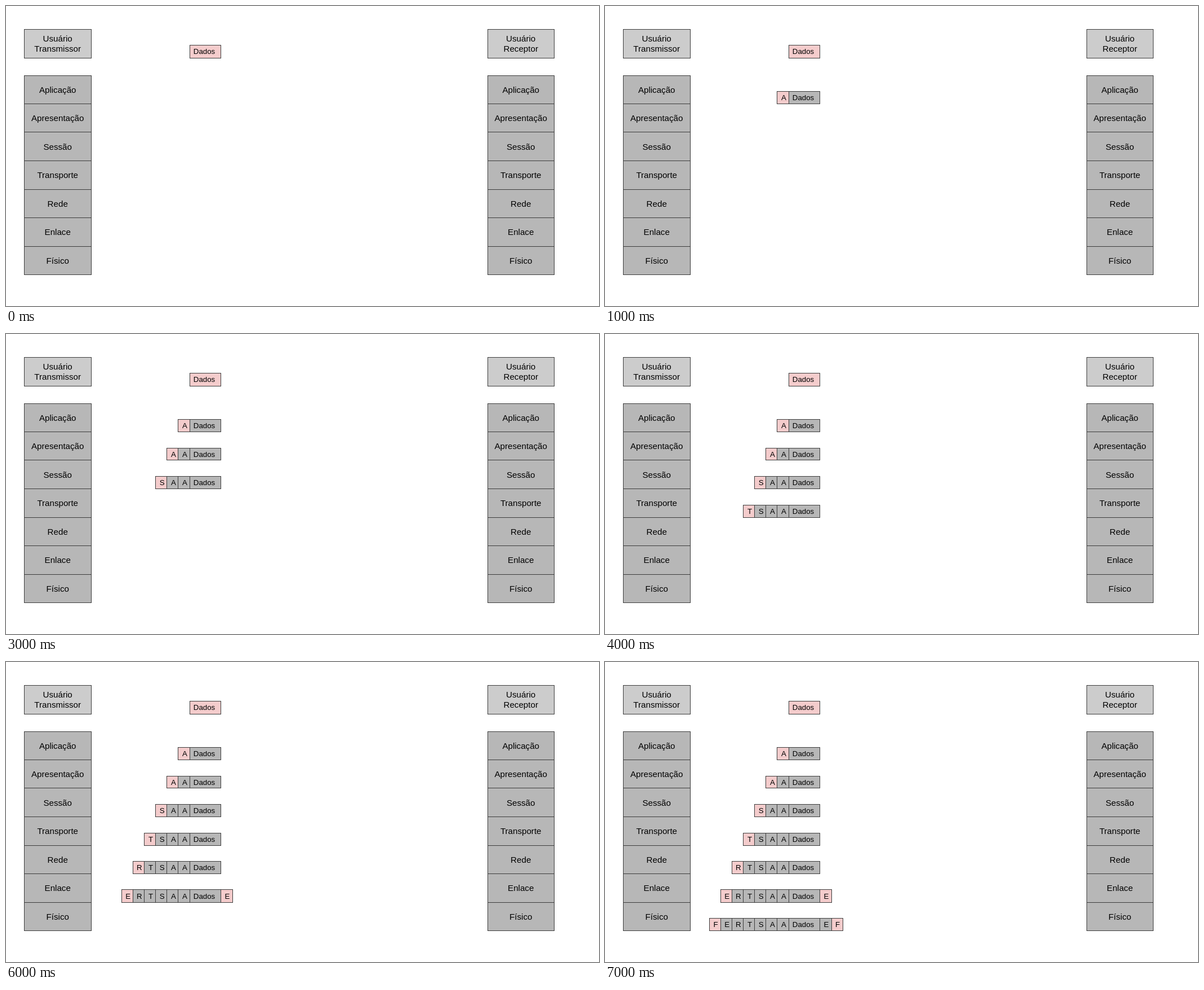
Animation, 1053 px wide and 532 px high, one loop 8000 ms. Source, as an HTML page with a canvas:

```html
<!DOCTYPE html>
<html lang="pt">
<head>
<meta charset="utf-8">
<title>Encapsulamento em camadas</title>
<style>
html, body { margin: 0; width: 100%; height: 100%; overflow: hidden; background: #fff; }
canvas { display: block; }
</style>
</head>
<body>
<canvas id="stage" width="1053" height="532"></canvas>
<script>
const ctx = document.getElementById('stage').getContext('2d');
const LOOP = 8000, STEP = 1000;
const PINK = '#f4cccc', GRAY = '#b7b7b7', LIGHT = '#cccccc', EDGE = '#3c3c3c';
const LAYERS = ['Aplicação', 'Apresentação', 'Sessão', 'Transporte', 'Rede', 'Enlace', 'Físico'];
const LINES = [123, 173, 223, 274, 325, 375, 426, 476];
const TOPS = [151, 202, 252, 303, 353, 403, 454];
const LEFT = 326, RIGHT = 381;
const BIG = 15.15, SMALL = 13.3;

function box(x1, y1, x2, y2, fill) {
  ctx.fillStyle = fill;
  ctx.fillRect(x1, y1, x2 - x1 + 1, y2 - y1 + 1);
  ctx.strokeStyle = EDGE;
  ctx.lineWidth = 1;
  ctx.strokeRect(x1 + 0.5, y1 + 0.5, x2 - x1, y2 - y1);
}

function label(text, x, y, size) {
  ctx.font = size + 'px "Liberation Sans", Arial, sans-serif';
  ctx.textAlign = 'center';
  ctx.fillStyle = '#000';
  ctx.fillText(text, x, Math.round(y));
}

function stack(x1, x2, user) {
  const mid = (x1 + x2) / 2 + 0.2;
  box(x1, 41, x2, 92, LIGHT);
  label('Usuário', mid, 63, BIG);
  label(user, mid, 81, BIG);
  LAYERS.forEach((name, i) => {
    box(x1, LINES[i], x2, LINES[i + 1], GRAY);
    label(name, mid, 153.9 + i * 50.45, BIG);
  });
}

// x of the n-th header edge left of the data, or trailer edge right of it
const headX = n => n ? 325 - 20 * n : LEFT;
const tailX = n => n ? 382 + 20 * n : RIGHT;

function packet(row) {
  const top = TOPS[row], bottom = LINES[row + 1], base = 167.2 + row * 50.5;
  box(LEFT, top, RIGHT, bottom, GRAY);
  label('Dados', 352, base, SMALL);
  for (let i = 0; i <= row; i++) {
    const fill = i === row ? PINK : GRAY, letter = LAYERS[i][0];
    box(headX(i + 1), top, headX(i), bottom, fill);
    label(letter, 317.5 - i * 20.17, base, SMALL);
    if (i > 4) {
      box(tailX(i - 5), top, tailX(i - 4), bottom, fill);
      label(letter, 393 + (i - 5) * 20.17, base, SMALL);
    }
  }
}

function draw(now) {
  const rows = Math.floor((now % LOOP) / STEP);
  ctx.fillStyle = '#fff';
  ctx.fillRect(0, 0, 1053, 532);
  stack(32, 151, 'Transmissor');
  stack(855, 973, 'Receptor');
  box(LEFT, 69, RIGHT, 92, PINK);
  label('Dados', 352, 85, SMALL);
  for (let i = 0; i < rows; i++) packet(i);
}

const start = performance.now();
function tick() {
  draw(performance.now() - start);
  requestAnimationFrame(tick);
}
tick();
</script>
</body>
</html>
```
